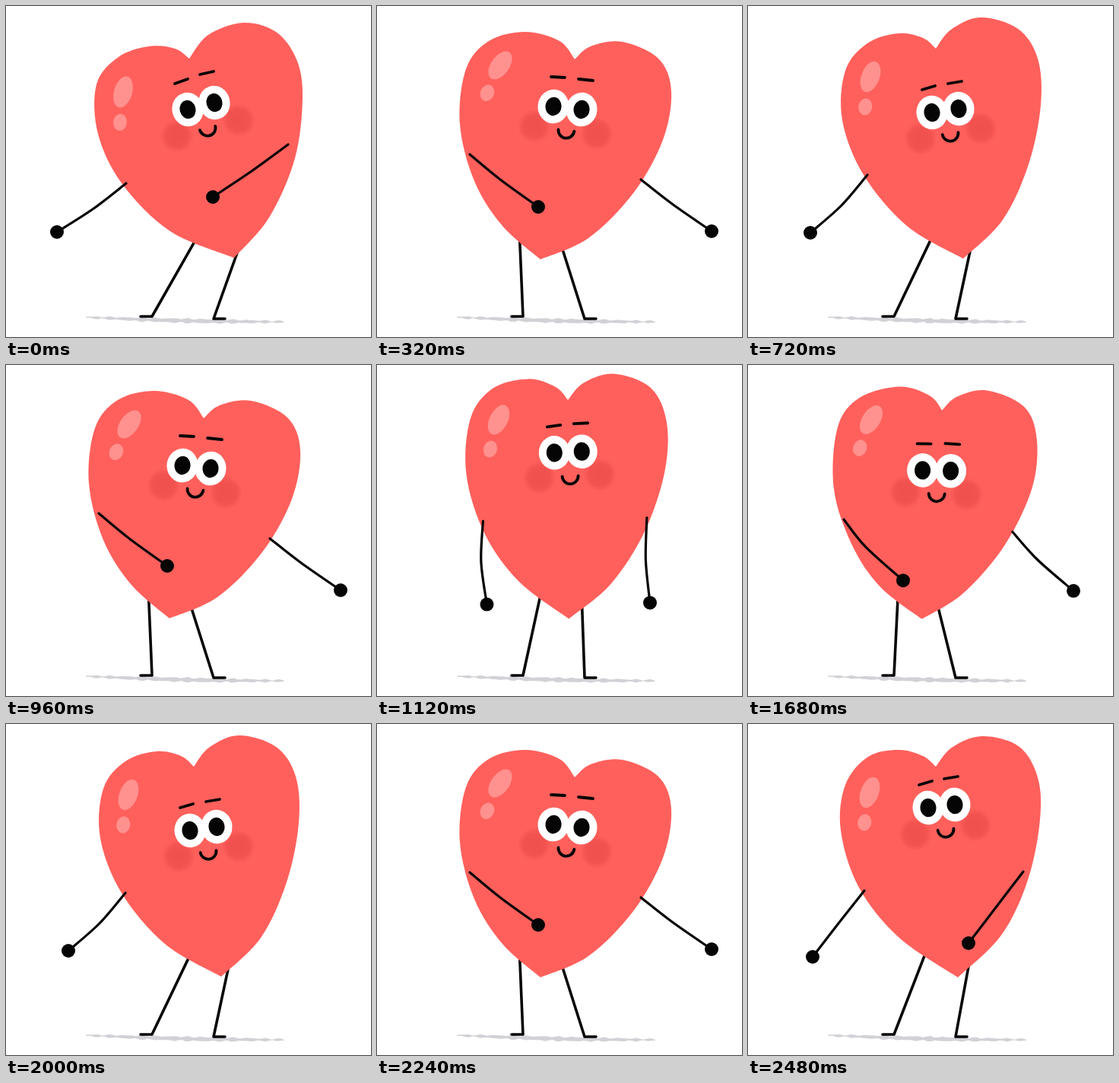
These frames come from a looping animation (480 by 435 pixels, 2560 ms). An HTML page with a canvas:

```html
<!DOCTYPE html>
<html lang="en">
<head>
<meta charset="utf-8">
<title>Dancing heart</title>
<style>
  html, body { margin: 0; width: 100%; height: 100%; overflow: hidden; background: #fff; }
  canvas { display: block; width: 480px; height: 435px; }
</style>
</head>
<body>
<canvas id="stage" width="480" height="435"></canvas>
<script>
const ctx = document.getElementById('stage').getContext('2d');
const STEP = 80, STEPS = 32;
const RED = '#ff605c', INK = '#050505';

const points = text => text.split(' ').map(p => p.split(',').map(Number));

// Each part lists its points so that reversing the order swaps left and right.
// Outline: notch, left side, tip, right side.
const outline = {
  right: points('241,69 222,56 188,53 148,67 119,103 121,168 153,234 216,296 300,331 346,278 380,200 390,120 382,70 355,34 312,22 266,38'),
  leaving: points('247,56 230,42 198,36 157,49 128,85 124,150 152,222 209,289 283,332 335,281 369,208 385,130 381,69 355,30 306,15 267,31'),
  left: points('260,70 240,46 195,34 147,46 117,83 109,155 128,230 165,289 215,333 278,305 337,246 376,176 387,112 370,69 322,47 281,53'),
  arriving: points('247,56 230,42 198,34 158,43 128,80 122,140 146,215 199,281 276,333 332,279 366,211 383,135 382,74 357,30 308,16 268,31')
};
// Face: cheek, brow ends, eye, mouth, eye, brow ends, cheek.
const face = {
  right: points('225,171 222,102 239,96 239,136 265,160 274,127 255,90 273,86 306,150'),
  leaving: points('227,174 229,110 246,105 242,140 266,167 277,135 263,102 281,99 306,161'),
  left: points('207,158 229,93 247,94 232,132 249,163 269,136 265,96 284,98 289,168'),
  arriving: points('220,145 225,80 242,75 237,110 260,138 272,106 258,72 276,69 299,133')
};
// Limbs: hand, elbow, shoulder, hip, hip, shoulder, elbow, hand.
const limbs = {
  right: points('67,297 114,267 158,233 245,315 302,330 371,182 323,217 272,251'),
  leaving: points('82,298 123,262 157,222 238,312 291,327 366,192 332,231 282,275'),
  left: points('212,264 162,228 122,195 188,314 245,323 347,228 388,260 440,296'),
  arriving: points('85,306 119,262 153,219 230,310 289,324 362,194 326,241 290,288')
};
// Highlight centre and tilt for each step of the sway.
const shine = [
  [154, 113, .1], [161, 93, .17], [160, 74, .28], [162, 73, .38],
  [162, 78, .44], [162, 72, .38], [160, 72, .28], [160, 90, .17]
];

const average = (a, b) => a.map((p, i) => [(p[0] + b[i][0]) / 2, (p[1] + b[i][1]) / 2]);

// Expands four drawn poses into a full sway of eight.
function sway(part, swap, lift) {
  const { right, leaving, left, arriving } = part;
  const mirrored = pose => left.map(([x, y], i) => {
    const j = swap(i), k = .8;
    return [x - k * (pose[j][0] - right[j][0]), y + k * (pose[j][1] - right[j][1])];
  });
  const between = (a, b) => average(a, b).map(([x, y], i) => [x, y + lift(y, i)]);
  const toLeft = mirrored(arriving), fromLeft = mirrored(leaving);
  return [right, leaving, between(leaving, toLeft), toLeft,
          left, fromLeft, between(fromLeft, arriving), arriving];
}

const stretch = y => -13 * (332 - y) / 305;
const limbLift = [20, 8, -6, -1, -1, -6, 8, 20];
const outlines = sway(outline, i => (16 - i) % 16, stretch);
const faces = sway(face, i => 8 - i, stretch);
const limbPoses = sway(limbs, i => 7 - i, (y, i) => limbLift[i]);

function ellipse(x, y, rx, ry, color, turn = 0) {
  ctx.fillStyle = color;
  ctx.beginPath();
  ctx.ellipse(x, y, rx, ry, turn, 0, Math.PI * 2);
  ctx.fill();
}

function line(width, ...pts) {
  ctx.lineWidth = width;
  ctx.beginPath();
  pts.forEach(p => ctx.lineTo(...p));
  ctx.stroke();
}

// Catmull-Rom spline that keeps its two ends as corners.
function spline(pts) {
  for (let i = 0; i < pts.length - 1; i++) {
    const a = pts[Math.max(i - 1, 0)], b = pts[i], c = pts[i + 1];
    const d = pts[Math.min(i + 2, pts.length - 1)];
    ctx.bezierCurveTo(
      b[0] + (c[0] - a[0]) / 6, b[1] + (c[1] - a[1]) / 6,
      c[0] - (d[0] - b[0]) / 6, c[1] - (d[1] - b[1]) / 6, c[0], c[1]);
  }
}

function drawGround() {
  const wobble = x => Math.sin(x * .31) * .6 + Math.sin(x * .83) * .5;
  ctx.fillStyle = '#d2d1d6';
  ctx.beginPath();
  for (let x = 105; x <= 366; x += 5) ctx.lineTo(x, 408 + (x - 105) * .023 + wobble(x));
  for (let x = 366; x >= 105; x -= 5) {
    const u = (x - 105) / 261;
    ctx.lineTo(x, 410 + u * 6 + 3.2 * Math.sin(u * Math.PI) + wobble(x + 9));
  }
  ctx.fill();
}

function drawLeg(hip, ankle, toe) {
  const inside = hip.map((v, i) => v + (v - ankle[i]) * .1);
  line(3.6, inside, ankle, toe);
}

function drawArm(shoulder, elbow, hand) {
  ctx.lineWidth = 3.2;
  ctx.beginPath();
  ctx.moveTo(...shoulder);
  spline([shoulder, elbow, hand]);
  ctx.stroke();
  ellipse(...hand, 9, 9, INK);
}

function drawHeart(pts) {
  ctx.fillStyle = RED;
  ctx.beginPath();
  ctx.moveTo(...pts[0]);
  spline(pts.slice(0, 9));
  spline([...pts.slice(8), pts[0]]);
  ctx.fill();
}

function drawShine([x, y, tilt]) {
  const color = '#ff918e';
  ellipse(x, y, 12, 21, color, tilt + .18);
  ellipse(x - 40 * Math.sin(tilt), y + 40 * Math.cos(tilt), 9, 11, color, tilt);
}

function drawCheek([x, y]) {
  const blush = ctx.createRadialGradient(x, y, 0, x, y, 22);
  blush.addColorStop(0, 'rgba(240,80,77,1)');
  blush.addColorStop(.65, 'rgba(240,80,77,.85)');
  blush.addColorStop(1, 'rgba(240,80,77,0)');
  ellipse(x, y, 22, 22, blush);
}

function drawFace([cheekL, browL1, browL2, eyeL, mouth, eyeR, browR1, browR2, cheekR]) {
  const tilt = Math.atan2(eyeR[1] - eyeL[1], eyeR[0] - eyeL[0]);
  [cheekL, cheekR].forEach(drawCheek);
  [eyeL, eyeR].forEach(p => ellipse(...p, 20.5, 22.3, '#fff', tilt));
  [eyeL, eyeR].forEach(p => ellipse(...p, 10.5, 12.2, INK, tilt));
  line(3.8, browL1, browL2);
  line(3.8, browR1, browR2);
  ctx.beginPath();
  ctx.ellipse(...mouth, 10.5, 10.7, tilt, .05, Math.PI - .05);
  ctx.stroke();
}

function draw() {
  const step = Math.floor(performance.now() / STEP) % STEPS;
  const pose = step % 8;
  const [handL, elbowL, shoulderL, hipL, hipR, shoulderR, elbowR, handR] = limbPoses[pose];
  ctx.fillStyle = '#fff';
  ctx.fillRect(0, 0, 480, 435);
  ctx.strokeStyle = INK;
  ctx.lineCap = ctx.lineJoin = 'round';
  drawGround();
  drawLeg(hipL, [192, 408], [177, 408]);
  drawLeg(hipR, [273, 411], [288, 411]);
  drawHeart(outlines[pose]);
  drawShine(shine[pose]);
  drawFace(faces[pose]);
  drawArm(shoulderL, elbowL, handL);
  // The right arm blinks out once in every second sway.
  if (step % 16 !== 9) drawArm(shoulderR, elbowR, handR);
  requestAnimationFrame(draw);
}
draw();
</script>
</body>
</html>
```
